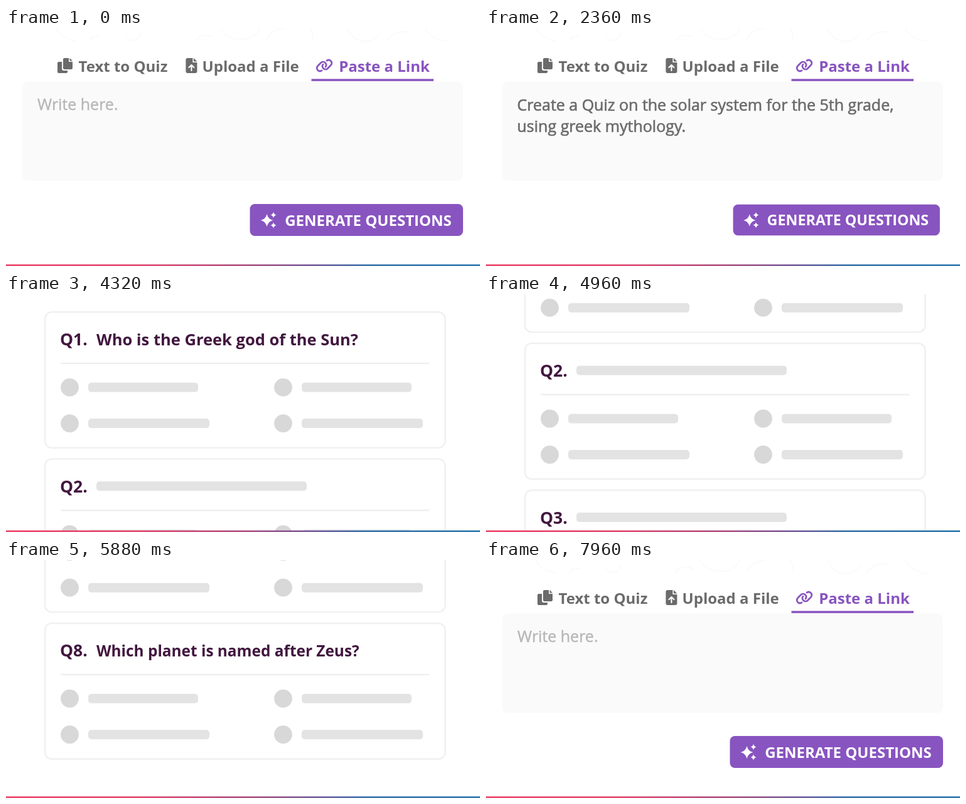
These frames come from a looping animation (755 px wide and 380 px high, 8470 ms). An HTML page:

```html
<!DOCTYPE html>
<html lang="en">
<head>
<meta charset="utf-8">
<title>Quiz generator</title>
<style>
  html, body { margin: 0; width: 100%; height: 100%; overflow: hidden; background: #fff; }
  svg { display: block; font-family: "Open Sans", "Noto Sans", sans-serif; }
  text { white-space: pre; }
  .bold { font-weight: 700; font-size: 24px; }
  .body { font-size: 25px; fill: #6b6b6b; stroke: #6b6b6b; stroke-width: .65; }
  .hint { fill: #b6b6b6; stroke: #b6b6b6; stroke-width: .4; }
  .ink { font-weight: 700; fill: #42173f; }
</style>
</head>
<body>
<svg width="755" height="380">
  <defs>
    <linearGradient id="rainbow">
      <stop offset="0" stop-color="#ee446b"/>
      <stop offset=".28" stop-color="#e2486f"/>
      <stop offset=".5" stop-color="#b05080"/>
      <stop offset=".66" stop-color="#725f9f"/>
      <stop offset=".76" stop-color="#3a74ab"/>
      <stop offset="1" stop-color="#2f79b0"/>
    </linearGradient>
    <clipPath id="clip1"><rect id="wipe1" x="48" y="105" height="38"/></clipPath>
    <clipPath id="clip2"><rect id="wipe2" x="48" y="140" height="38"/></clipPath>
    <clipPath id="top"><rect width="755" height="22"/></clipPath>
    <path id="hook" d="M411 75C456 43 517 48 557 86C601 130 601 201 557 245L445 357C401 401 330 401 286 357C247 318 242 257 274 212"/>
    <path id="star" d="M0-10Q1.8-1.8 10 0Q1.8 1.8 0 10Q-1.8 1.8-10 0Q-1.8-1.8 0-10Z"/>
  </defs>

  <g id="form">
    <g clip-path="url(#top)" fill="none" stroke="#f9f9f9" stroke-width="1.4">
      <path d="M79 0Q86 16 112 21M133 22Q136 10 150 14M190 10A12 12 0 1 0 214 6M300 22Q312 6 330 14M341 0Q352 22 386 17Q400 12 404 0M414 22Q420 2 446 0M484 0Q492 12 488 22M545 0A28 28 0 0 0 598 4M606 22Q616 4 640 6M668 0Q676 18 704 22"/>
    </g>

    <g fill="#6b6b6b">
      <path d="M84 54H89V65Q89 68 92 68H98V70Q98 72 96 72H84Q82 72 82 70V56Q82 54 84 54Z"/>
      <path d="M93 48H100V54H106V64Q106 66 104 66H93Q91 66 91 64V50Q91 48 93 48ZM101.5 48L106 52.5H101.5Z"/>
      <g transform="translate(-.6 0)">
        <path d="M290 48H298V55H305V69Q305 72 302 72H290Q287 72 287 69V51Q287 48 290 48ZM299.5 48L305 53.5H299.5Z"/>
        <path d="M296 68V59.5M292 63L296 59L300 63" fill="none" stroke="#fff" stroke-width="2.1" stroke-linecap="round" stroke-linejoin="round"/>
      </g>
      <text class="bold" x="115.5" y="69.5">Text to Quiz</text>
      <text class="bold" x="312.6" y="69.5">Upload a File</text>
    </g>

    <rect x="26" y="85.3" width="702" height="159" rx="9" fill="#fafafa"/>
    <g fill="#8854c0">
      <g transform="translate(493 48.8) scale(.04375)" fill="none" stroke="#8854c0" stroke-width="62" stroke-linecap="round">
        <use href="#hook"/>
        <use href="#hook" transform="rotate(180 320 256)"/>
      </g>
      <text class="bold" x="530.2" y="69.5">Paste a Link</text>
      <rect x="486.5" y="81.3" width="194.5" height="3.5"/>
    </g>

    <text id="hint" class="body hint" x="50" y="131">Write here.</text>
    <g clip-path="url(#clip1)"><text class="body" x="49.5" y="132">Create a Quiz on the solar system for the 5th grade,</text></g>
    <g clip-path="url(#clip2)"><text class="body" x="49.5" y="166.4">using greek mythology.</text></g>

    <g id="button">
      <rect x="388.5" y="281" width="339.5" height="51" rx="8" fill="#8854c0"/>
      <g fill="#fff">
        <use href="#star" transform="translate(415.5 307)"/>
        <use href="#star" transform="translate(426 298.5) scale(.48)"/>
        <use href="#star" transform="translate(426 315) scale(.48)"/>
        <text class="bold" x="444.2" y="315.5">GENERATE QUESTIONS</text>
      </g>
    </g>
  </g>

  <g id="quiz"></g>
  <rect y="377.4" width="755" height="2.6" fill="url(#rainbow)"/>
</svg>

<script>
const LOOP = 8470, PITCH = 234.6, SCROLL = 1617;
const $ = id => document.getElementById(id);

const bar = (x, y, w) => `<rect x="${x}" y="${y}" width="${w}" height="15" rx="5" fill="#e3e3e3"/>`;
const option = (x, y, w) =>
  `<circle cx="${x}" cy="${y}" r="14.4" fill="#d8d8d8"/>` + bar(x + 29.5, y - 7.5, w);
const title = (size, words) => `<text class="ink" x="144" y="82.3" font-size="${size}">${words}</text>`;
const titles = {
  1: title(25.5, "Who is the Greek god of the Sun?"),
  8: title(24.4, "Which planet is named after Zeus?")
};

const card = n => `<g transform="translate(0 ${(n - 1) * PITCH})">
  <rect x="62" y="29.2" width="637.5" height="216.8" rx="11" fill="#fff" stroke="#f0f0f1" stroke-width="2.4"/>
  <text class="ink" x="86" y="82.5" font-size="26.5">Q${n}.</text>
  ${titles[n] || bar(144, 65, 335)}
  <rect x="87" y="110" width="587.5" height="2.4" fill="#efeff0"/>
  ${[101.5, 441.5].map(x => option(x, 149.5, 175) + option(x, 207, 193)).join("")}
</g>`;
$("quiz").innerHTML = [1, 2, 3, 4, 5, 6, 7, 8].map(card).join("");

const ramp = (t, from, to) => Math.min(1, Math.max(0, (t - from) / (to - from)));

// Symmetric cubic Bezier easing (a, 0, 1 - a, 1), solved by bisection.
function glide(p, a = 0.783) {
  let low = 0, high = 1;
  for (let i = 0; i < 24; i++) {
    const u = (low + high) / 2, v = 1 - u;
    const x = 3 * a * u * v * v + 3 * (1 - a) * u * u * v + u ** 3;
    if (x < p) low = u; else high = u;
  }
  return low * low * (3 - 2 * low);
}

function draw(t) {
  $("form").setAttribute("opacity", 1 - ramp(t, 2840, 3040) + ramp(t, 7600, 7960));
  $("quiz").setAttribute("opacity", ramp(t, 3280, 3560) - ramp(t, 7080, 7280));

  const typing = t >= 40 && t < 7300;
  $("hint").setAttribute("visibility", typing ? "hidden" : "visible");
  const line2 = 1 - (1 - ramp(t, 920, 1560)) ** 2;
  $("wipe1").setAttribute("width", typing ? 606 * ramp(t, 20, 920) : 0);
  $("wipe2").setAttribute("width", typing ? 284 * line2 : 0);

  const press = 1 - 0.03 * Math.sin(Math.PI * ramp(t, 1900, 2780));
  $("button").setAttribute("transform",
    `translate(558 306.5) scale(${press}) translate(-558 -306.5)`);

  const shift = SCROLL * glide(ramp(t, 4280, 6280));
  $("quiz").setAttribute("transform", `translate(0 ${-shift})`);
}

function tick() {
  draw(performance.now() % LOOP);
  requestAnimationFrame(tick);
}
tick();
</script>
</body>
</html>
```
